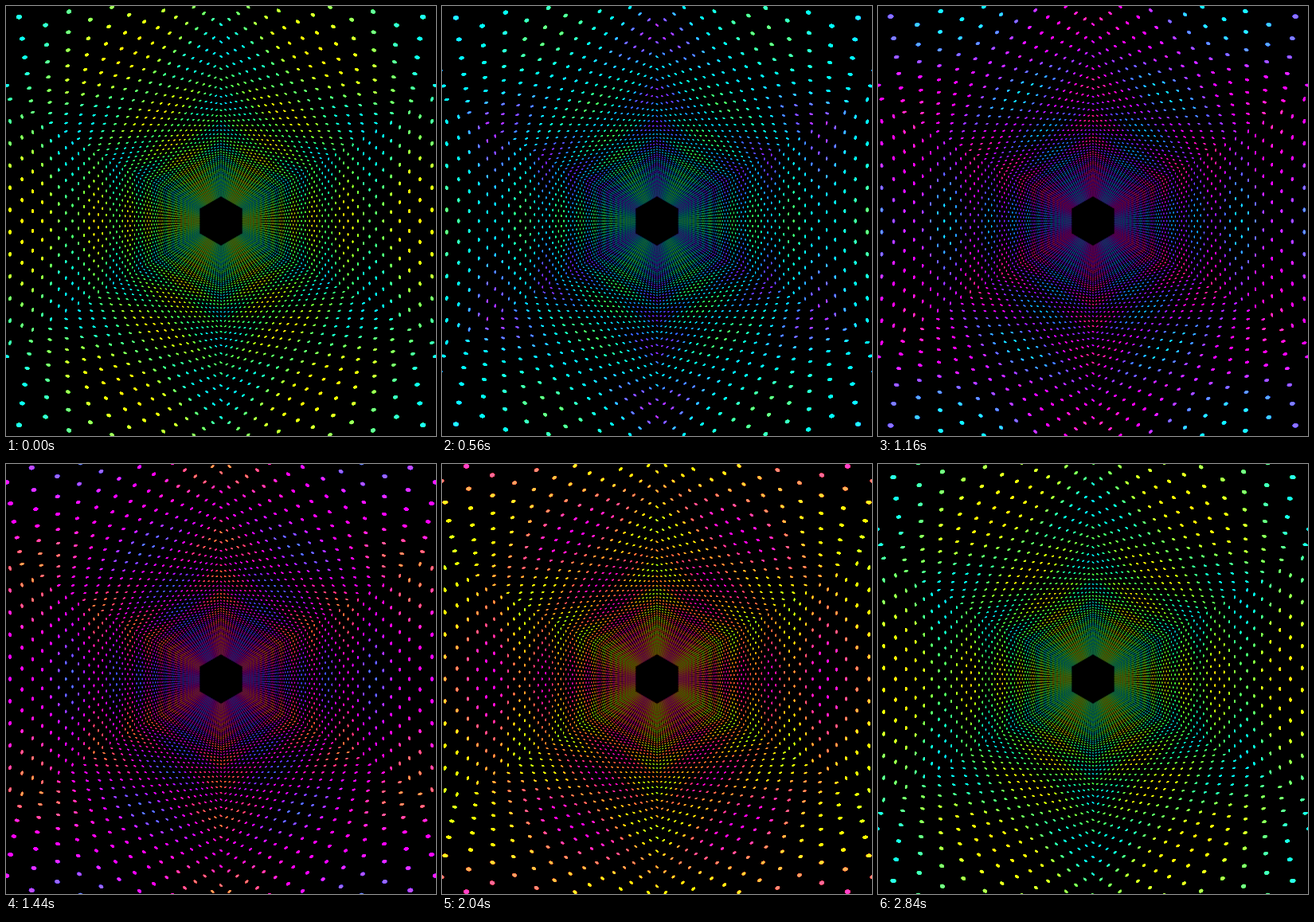
These frames come from a looping animation (540x540 px, 2.88 s). An HTML page with a canvas:

```html
<!DOCTYPE html>
<html lang="en">
<head>
<meta charset="utf-8">
<title>Hexagonal dot tunnel</title>
<style>
  html, body { margin: 0; width: 100%; height: 100%; overflow: hidden; background: #000; }
  canvas { display: block; width: 100%; height: 100%; }
</style>
</head>
<body>
<canvas id="stage" width="540" height="540"></canvas>
<script>
const SIZE = 540, CENTER = SIZE / 2;
const STEP_MS = 40, STEPS = 72;
const TAU = Math.PI * 2;

const FOCAL = 401;             // perspective strength in pixels
const RING_GAP = 0.0002267;    // growth of 1 / apothem from ring to ring
const FIRST_DEPTH = 16.65;     // depth of ring 0 at time 0, in rings
const NEAR = 11, FAR = 163.4;  // visible depth range
const RINGS_PER_LOOP = 10;
const DOTS_PER_WALL = 11;
const DOT_RADIUS = 0.0088;     // relative to the tunnel's apothem
const GAIN = 2.1;              // overexposure that saturates the hues
const GAMMA = 2.2;

const ctx = document.getElementById('stage').getContext('2d');
const image = ctx.createImageData(SIZE, SIZE);
const light = new Float32Array(SIZE * SIZE * 3);

// Linear light to overexposed display values
const LEVELS = 8192;
const encode = Uint8Array.from({ length: LEVELS + 1 }, (_, i) =>
  Math.min(255, Math.round(255 * GAIN * (i / LEVELS) ** (1 / GAMMA))));

function dotColor(hue) {
  return [0, 120, 240].map(offset =>
    (0.5 + 0.5 * Math.cos((hue - offset) * TAU / 360)) ** GAMMA);
}

// Adds an antialiased ellipse with half axes (ux, uy) and (vx, vy).
function addDot(x, y, ux, uy, vx, vy, color) {
  const xx = ux * ux + vx * vx + 1 / 3;
  const yy = uy * uy + vy * vy + 1 / 3;
  const xy = ux * uy + vx * vy;
  const det = xx * yy - xy * xy;
  const mean = det ** 0.25;
  const reach = 1 + 0.5 / mean;
  const rx = Math.sqrt(xx) * reach, ry = Math.sqrt(yy) * reach;
  if (x + rx < 0 || x - rx > SIZE || y + ry < 0 || y - ry > SIZE) return;

  const hits = [];
  let total = 0;
  for (let py = Math.floor(y - ry); py <= y + ry; py++) {
    for (let px = Math.floor(x - rx); px <= x + rx; px++) {
      const dx = px + 0.5 - x, dy = py + 0.5 - y;
      const q = Math.sqrt((yy * dx * dx - 2 * xy * dx * dy + xx * dy * dy) / det);
      const weight = Math.min(1, (1 - q) * mean + 0.5);
      if (weight <= 0) continue;
      total += weight;
      if (px >= 0 && px < SIZE && py >= 0 && py < SIZE) {
        hits.push((py * SIZE + px) * 3, weight);
      }
    }
  }
  const scale = Math.PI * Math.abs(ux * vy - uy * vx) / total;
  for (let i = 0; i < hits.length; i += 2) {
    for (let c = 0; c < 3; c++) light[hits[i] + c] += color[c] * hits[i + 1] * scale;
  }
}

function addRing(ring, depth, progress) {
  const apothem = 1 / (RING_GAP * depth);
  const spacing = apothem * 2 / Math.sqrt(3) / DOTS_PER_WALL;
  const radius = DOT_RADIUS * apothem;
  const stretch = radius / FOCAL;
  const start = ring % 2 ? -5 : -5.5;   // alternate rings are staggered
  const ringWave = Math.cos((ring - 6.55) * TAU / 10);

  for (let i = 0; i < DOTS_PER_WALL; i++) {
    const slot = start + i;
    const wallWave = -Math.cos(slot * TAU / DOTS_PER_WALL);
    const color = dotColor(123 + 360 * progress + 35 * (ringWave + wallWave));
    for (let wall = 0; wall < 6; wall++) {
      const cos = Math.cos(wall * TAU / 6), sin = Math.sin(wall * TAU / 6);
      const x = apothem * cos - slot * spacing * sin;
      const y = apothem * sin + slot * spacing * cos;
      addDot(CENTER + x, CENTER + y, -sin * radius, cos * radius,
             x * stretch, y * stretch, color);
    }
  }
}

function draw(progress) {
  light.fill(0);
  const shift = FIRST_DEPTH - RINGS_PER_LOOP * progress;
  for (let ring = Math.ceil(NEAR - shift); ring + shift < FAR; ring++) {
    addRing(ring, ring + shift, progress);
  }
  for (let i = 0, p = 0; i < light.length; p += 4) {
    for (let c = 0; c < 3; c++) {
      image.data[p + c] = encode[Math.min(1, light[i++]) * LEVELS | 0];
    }
    image.data[p + 3] = 255;
  }
  ctx.putImageData(image, 0, 0);
}

const startTime = performance.now();
let shown = -1;

function tick() {
  const step = Math.floor((performance.now() - startTime) / STEP_MS) % STEPS;
  if (step !== shown) draw((shown = step) / STEPS);
  requestAnimationFrame(tick);
}
tick();
</script>
</body>
</html>
```
